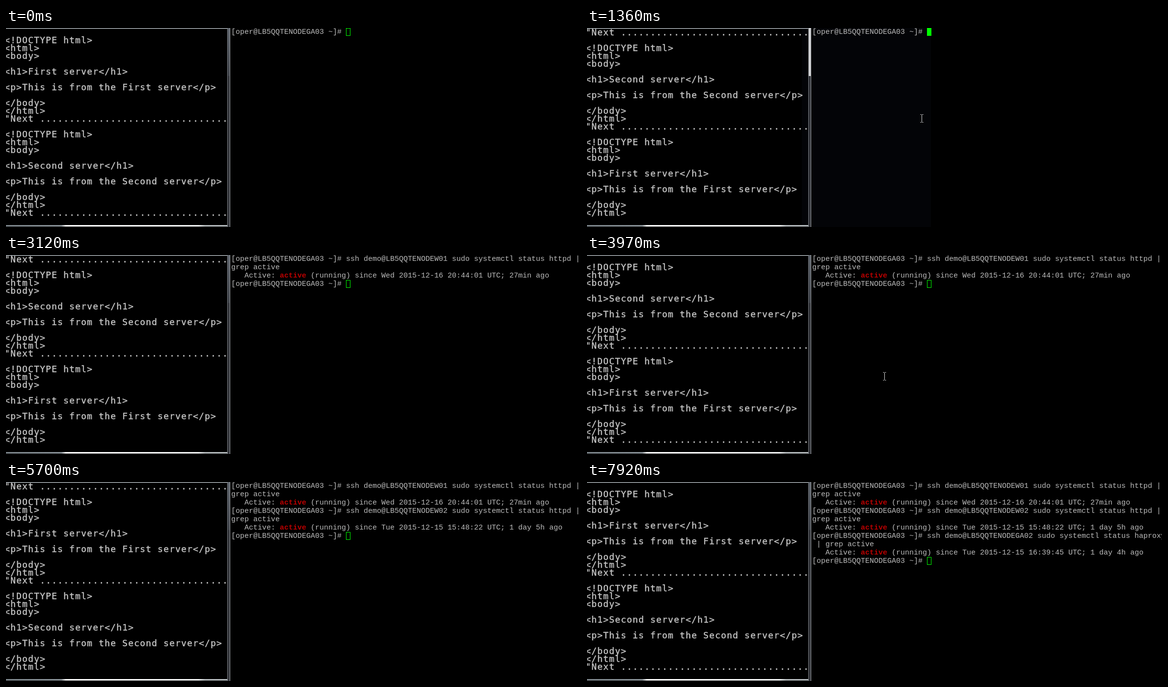
An HTML page for the animation above (8000 ms loop, 1172x406 px).

```html
<!DOCTYPE html>
<html lang="en">
<head>
<meta charset="utf-8">
<title>Two terminals</title>
<style>
  html, body { margin: 0; width: 100%; height: 100%; overflow: hidden; background: #000; }
  svg { display: block; width: 1172px; height: 406px; }
  text { white-space: pre; }
  #log { font: 18px "DejaVu Sans Mono", monospace; letter-spacing: 1.163px;
         fill: #c4c4c4; stroke: #c4c4c4; stroke-width: .4px; }
  #shell { font: 15px "Liberation Mono", "Courier New", monospace; fill: #bbb; }
  .hit { font-weight: bold; fill: #b00; }
</style>
</head>
<body>
<svg viewBox="0 0 1172 406">
  <defs>
    <clipPath id="leftPane"><rect width="451" height="402"/></clipPath>
    <linearGradient id="edge">
      <stop offset="0" stop-color="#7d868c"/>
      <stop offset=".25" stop-color="#8a9399"/>
      <stop offset=".27" stop-color="#fff"/>
      <stop offset=".87" stop-color="#f4f6f6"/>
      <stop offset=".9" stop-color="#b4babd"/>
      <stop offset="1" stop-color="#b4babd"/>
    </linearGradient>
    <linearGradient id="thumb" x2="0" y2="1">
      <stop offset="0" stop-color="#5c636c"/>
      <stop offset="1" stop-color="#3a3e45"/>
    </linearGradient>
  </defs>
  <rect width="1172" height="406"/>
  <g id="tint" fill="#030407">
    <rect x="438" width="13" height="402"/>
    <rect id="tintRight" x="458" width="243"/>
  </g>
  <g id="log" clip-path="url(#leftPane)"></g>
  <rect width="451" height="1.4" fill="#b9c1c6"/>
  <rect y="402" width="451" height="3" fill="url(#edge)"/>
  <rect x="451" width="6" height="406" fill="#303238"/>
  <rect id="bar" x="452" width="4" height="98"/>
  <path d="M451.5 0V406" stroke="#777a80"/>
  <path d="M456.5 0V406" stroke="#a3a6aa"/>
  <g id="shell"></g>
  <rect id="cursor" stroke="#0f0" width="8" height="15"/>
  <path id="pointer" d="M-3-8h2l1 1 1-1h2M0-7v14M-3 8h2l1-1 1 1h2" fill="none" stroke="#ddd"/>
</svg>
<script>
const LOOP = 8000;
const $ = id => document.getElementById(id);

// Left pane: pages fetched in turn, seen through a 24-line window
const page = name => ['', '<!DOCTYPE html>', '<html>', '<body>', '',
  `<h1>${name} server</h1>`, '', `<p>This is from the ${name} server</p>`, '',
  '</body>', '</html>', '"Next ' + '.'.repeat(34)];
const log = ['First', 'Second', 'First', 'Second'].flatMap(page);
const scrolls = [[0, 0], [300, 11], [3240, 12], [4270, 23], [7240, 24]];

// Right pane: each job has a paste time, a finish time and its rows
const prompt = '[oper@LB5QQTENODEGA03 ~]# ';
const active = since => `   Active: active (running) since ${since} ago`;
const jobs = [
  { paste: 1670, done: 1830, rows: ['ssh demo@LB5QQTENODEW01 sudo systemctl status httpd | ',
    'grep active', active('Wed 2015-12-16 20:44:01 UTC; 27min')] },
  { paste: 4270, done: 4430, rows: ['ssh demo@LB5QQTENODEW02 sudo systemctl status httpd | ',
    'grep active', active('Tue 2015-12-15 15:48:22 UTC; 1 day 5h')] },
  { paste: 6640, done: 6840, rows: ['ssh demo@LB5QQTENODEGA02 sudo systemctl status haproxy',
    ' | grep active', active('Tue 2015-12-15 16:39:45 UTC; 1 day 4h')] }
];

const focus = [[0, false], [1360, true], [3120, false], [4120, true], [5700, false], [6440, true], [7920, false]];
// Top of the faint tint in the right pane, or null when absent
const tints = [[0, null], [1360, 0], [1670, 68], [3120, null], [6440, 219], [7920, null]];
const pointerPath = [[0, null], [300, [680, 251]], [450, [667, 224]], [820, [671, 211]],
  [950, [678, 193]], [1090, [682, 184]], [2380, [671, 232]], [2520, [649, 334]], [2660, null],
  [3670, [634, 345]], [3820, [612, 276]], [3970, [606, 247]], [4120, [607, 247]],
  [4740, [597, 301]], [4890, null]];

const at = (steps, t) => steps.findLast(([start]) => t >= start)[1];

function set(el, attrs) {
  for (const [key, value] of Object.entries(attrs)) el.setAttribute(key, value);
}

function make(tag, parent, attrs) {
  const el = document.createElementNS('http://www.w3.org/2000/svg', tag);
  set(el, attrs);
  return parent.appendChild(el);
}

const show = (el, on) => set(el, { visibility: on ? 'visible' : 'hidden' });

const logLines = Array.from({ length: 24 }, (_, i) => make('text', $('log'), { x: -3, y: 15 + 16 * i }));
const shellLines = Array.from({ length: 10 }, (_, i) => make('text', $('shell'), { x: 459, y: 12 + 17 * i }));

function writeShell(line, row) {
  if (line.dataset.row === row) return;
  line.dataset.row = row;
  line.textContent = '';
  row.split(/(?<=Active: )(active)/).forEach((part, i) => {
    make('tspan', line, i === 1 ? { class: 'hit' } : {}).textContent = part;
  });
}

function shellRows(t) {
  const rows = [prompt];
  for (const { paste, done, rows: [command, rest, result] } of jobs) {
    if (t < paste) break;
    rows[rows.length - 1] += command;
    rows.push(rest);
    rows.push(...(t < done ? [''] : [result, prompt]));
  }
  return rows;
}

function render(t) {
  const top = at(scrolls, t);
  logLines.forEach((line, i) => {
    if (line.textContent !== log[top + i]) line.textContent = log[top + i];
  });

  const rows = shellRows(t);
  shellLines.forEach((line, i) => writeShell(line, rows[i] || ''));

  const focused = at(focus, t);
  const last = rows.length - 1;
  set($('cursor'), {
    x: 459.5 + 9 * rows[last].length,
    y: 17 * last + 0.5,
    fill: focused ? '#0f0' : 'none'
  });
  set($('bar'), { fill: focused ? '#d2d3d5' : 'url(#thumb)' });

  const tintTop = at(tints, t);
  show($('tint'), tintTop !== null);
  if (tintTop !== null) set($('tintRight'), { y: tintTop, height: 406 - tintTop });

  const spot = at(pointerPath, t);
  show($('pointer'), spot);
  if (spot) set($('pointer'), { transform: `translate(${spot[0] + 0.5} ${spot[1] + 0.5})` });
}

function tick() {
  render(performance.now() % LOOP);
  requestAnimationFrame(tick);
}
tick();
</script>
</body>
</html>
```
